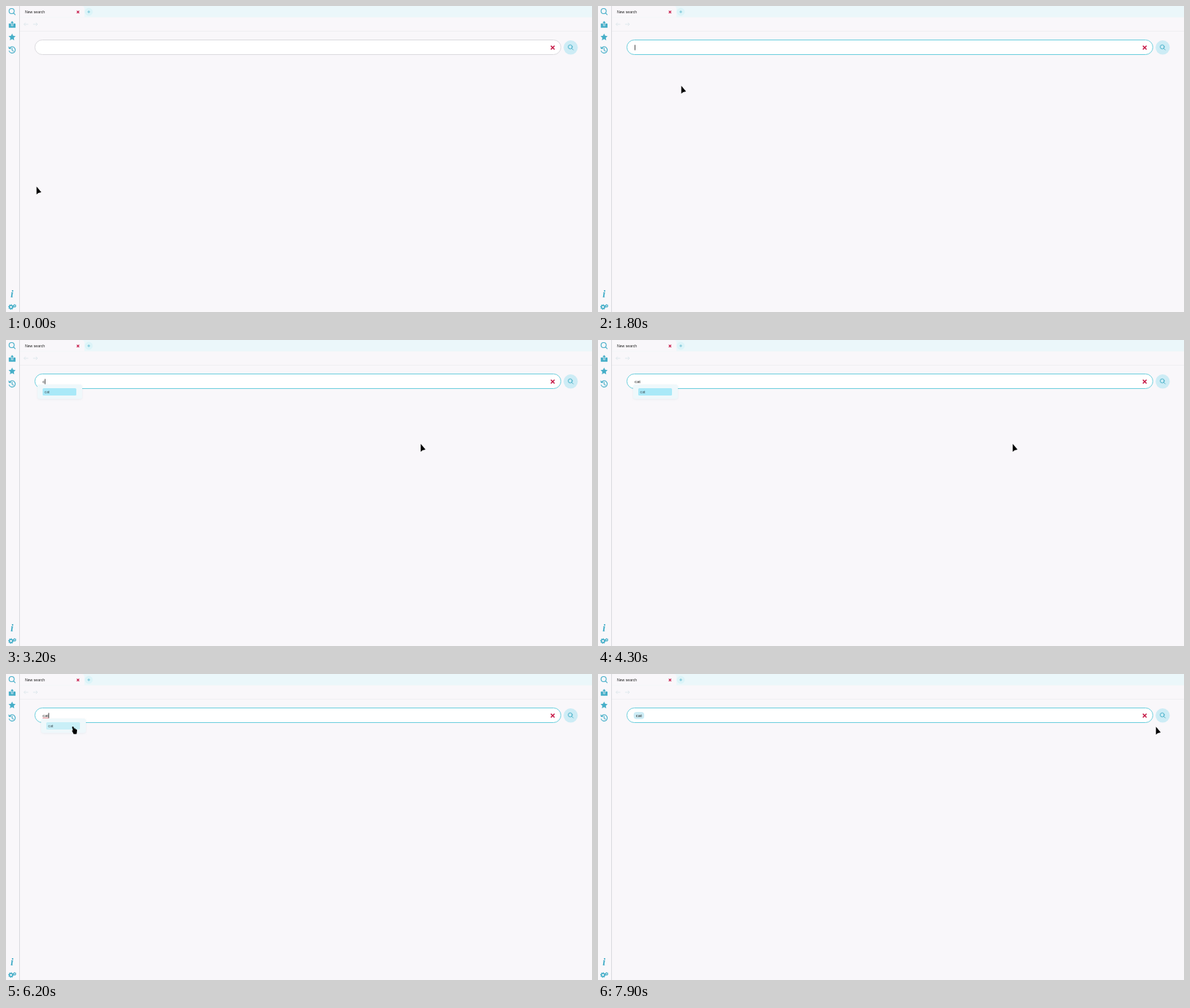
These frames come from a looping animation (800 px wide and 419 px high, 8000 ms). An HTML page:

```html
<!DOCTYPE html>
<html lang="en">
<head>
<meta charset="utf-8">
<title>Search field</title>
<style>
  html, body { margin: 0; width: 100%; height: 100%; overflow: hidden; background: #f9f7fa; }
  svg { display: block; width: 100vw; height: 100vh; }
  text { font-family: "Liberation Sans", Arial, sans-serif; font-size: 6px; fill: #222; }
  .line { fill: none; stroke: #45aec8; stroke-width: 1.1; stroke-linecap: round; stroke-linejoin: round; }
  .solid { fill: #45aec8; }
  .info { font: italic bold 14px "Liberation Serif", "Times New Roman", serif; fill: #45aec8; }
  .cross { fill: none; stroke: #c30d3f; }
</style>
</head>
<body>
<svg viewBox="0 0 800 419" preserveAspectRatio="none">
  <defs>
    <filter id="soft" x="-20%" y="-40%" width="140%" height="190%">
      <feDropShadow dx="0" dy=".6" stdDeviation="1.2" flood-color="#7fa5b0" flood-opacity=".16"/>
    </filter>
  </defs>
  <rect width="800" height="419" fill="#f9f7fa"/>

  <!-- tab strip and toolbar -->
  <rect x="19" width="781" height="15.5" fill="#ebf7fa"/>
  <path d="M19 0H103Q107 0 107 4V15.5H19Z" fill="#f9f7fa"/>
  <text x="26" y="10" style="font-size:5.15px">New search</text>
  <path class="cross" stroke-width="1.1" d="M96.7 6.7l3.2 3.2m0-3.2l-3.2 3.2"/>
  <circle cx="113" cy="8" r="5.4" fill="#dcf4f8"/>
  <path class="line" stroke-linecap="butt" style="stroke-width:.6" d="M111.5 8h3M113 6.5v3"/>
  <path d="M24.5 25h6M26.7 22.8L24.5 25l2.2 2.2M37 25h6M40.8 22.8L43 25l-2.2 2.2" fill="none" stroke="#dce6ea" stroke-width=".9"/>
  <path d="M19 34.5H800" stroke="#f0eff2" stroke-width="1"/>

  <!-- side bar -->
  <path d="M18.5 0V419" stroke="#dadade" stroke-width="1"/>
  <g class="line">
    <circle cx="7.7" cy="7" r="3.5"/>
    <path d="M10.3 9.7l2.2 2.2"/>
    <path d="M4.7 57.8A4.3 4.3 0 1 1 4.3 61.6M3.9 56l.5 2.3 2.3-.2M8.3 57.9v2.7l1.8 1.1"/>
  </g>
  <rect class="solid" x="3.8" y="24" width="9.2" height="5.8" rx=".6"/>
  <path class="solid" d="M8.4 20.2L11.5 23.6H9.4V27H7.4V23.6H5.3Z" stroke="#f9f7fa" stroke-width=".7"/>
  <path class="solid" d="M8.3 37.8l1.45 3.05 3.35.45-2.45 2.3.6 3.3-2.95-1.6-2.95 1.6.6-3.3-2.45-2.3 3.35-.45Z"/>
  <text class="info" x="6.3" y="399.3">i</text>
  <g id="gears"></g>

  <!-- search field -->
  <rect id="field" x="39.5" y="46.5" width="718" height="20" rx="10" fill="#fff" stroke-width="1"/>
  <path class="cross" stroke-width="1.4" d="M743.8 54.4l5 5m0-5l-5 5"/>
  <circle cx="770.9" cy="56.8" r="9.7" fill="#cdecf5"/>
  <g class="line" style="stroke-width:.9">
    <circle cx="770.3" cy="56" r="2.8"/>
    <path d="M772.4 58.1l2 2"/>
  </g>

  <g id="chip">
    <rect x="48.7" y="52" width="14.4" height="9.7" rx="4" fill="#cdecf5"/>
    <text x="51.8" y="59">cat</text>
  </g>
  <text id="typed" x="50" y="59"></text>
  <path id="squiggle" d="M50 60.6l1-.8 1 .8 1-.8 1 .8 1-.8 1 .8 1-.8 1 .8" fill="none" stroke="#e0303a" stroke-width=".6"/>
  <g id="popup">
    <rect x="43" y="61" width="61" height="19.8" rx="3" fill="#eff8fb" filter="url(#soft)"/>
    <rect id="option" x="50" y="66" width="46" height="10" rx="1.5"/>
    <text x="52.5" y="73" style="font-size:5.3px;fill:#40545c">cat</text>
  </g>
  <path id="caret" d="M0 53.3v7.2" stroke="#222" stroke-width=".8"/>

  <g id="cursor">
    <path id="arrow" d="M.7 .2V10.9L3.2 9 7.2 8Z"/>
    <path id="beam" d="M-1.5 -4h3M0 -4v8M-1.5 4h3" stroke="#222" stroke-width=".8"/>
    <path id="hand" d="M-.1 0Q1.2-.4 1.5 .9L2 3.4Q3-.1 3.6 3.5 4.5 3 4.8 4.1 5.9 3.8 6 5.2L5.7 8.3 5.2 10.2H1.4L-.6 6.6Q-1.7 5.4-.3 5.2L.4 5.8-.7 1Q-.8.2-.1 0Z"/>
  </g>
</svg>
<script>
const LOOP = 8000, STEP = 100, BLINK = 530;
const $ = id => document.getElementById(id);
const show = (id, on) => { $(id).style.display = on ? "" : "none"; };

// pointer stops: time, x, y
const path = [
  [0, 41, 247], [200, 48, 232], [800, 114.5, 81], [1100, 118, 57], [1400, 118, 57],
  [1800, 113, 109], [2500, 113, 109], [3200, 565.5, 142], [4700, 565.5, 142],
  [5200, 205, 90], [5450, 150, 82], [5900, 91, 72], [6500, 91, 72],
  [7200, 470, 125], [7700, 761, 72], [8000, 761, 72]
];
const FOCUS = 1400, PICK = 6300;
const keys = [[3000, "c"], [3400, "ca"], [3600, "cat"]];
const caretAt = [50.5, 53.3, 56.6, 58.3];

function gear(x, y, r, teeth) {
  let d = "";
  for (let i = 0; i < teeth * 4; i++) {
    const a = (i + .5) / (teeth * 4) * Math.PI * 2;
    const q = i % 4 < 2 ? r : r * .78;
    d += (i ? "L" : "M") + (x + q * Math.cos(a)).toFixed(2) + " " + (y + q * Math.sin(a)).toFixed(2);
  }
  const h = r * .36;
  d += `ZM${x - h} ${y}a${h} ${h} 0 1 0 ${2 * h} 0a${h} ${h} 0 1 0 ${-2 * h} 0Z`;
  return `<path class="solid" fill-rule="evenodd" d="${d}"/>`;
}
$("gears").innerHTML = gear(6.8, 412.2, 3.8, 8) + gear(11.8, 410.6, 2.3, 6);

function pointerAt(t) {
  const i = Math.max(1, path.findIndex(p => p[0] > t));
  const [t0, x0, y0] = path[i - 1], [t1, x1, y1] = path[i];
  const u = (t - t0) / (t1 - t0), e = u * u * (3 - 2 * u);
  return [x0 + (x1 - x0) * e, y0 + (y1 - y0) * e];
}

function draw(t) {
  const focused = t >= FOCUS, picked = t >= PICK;
  const word = picked ? "" : keys.reduce((w, [at, s]) => t >= at ? s : w, "");
  const [x, y] = pointerAt(t);
  const open = word !== "";
  const hover = open && x < 101 && y > 65 && y < 77;
  const inField = !hover && x > 40 && x < 757 && y > 47 && y < 66;

  $("field").setAttribute("stroke", focused ? "#6dcfdd" : "#dcdbdf");
  $("typed").textContent = word;
  show("chip", picked);
  show("squiggle", t >= 5900 && !picked);
  show("popup", open);
  $("popup").setAttribute("transform", `translate(${[0, 0, 3, 5][word.length]} 0)`);
  $("option").setAttribute("fill", hover ? "#c9eff7" : "#a9e9f8");

  // the blink restarts on focus, on each key and on the pick
  const since = [FOCUS, ...keys.map(k => k[0]), PICK].reduce((a, b) => t >= b ? b : a, 0);
  show("caret", focused && Math.floor((t - since) / BLINK) % 2 === 0);
  $("caret").setAttribute("transform", `translate(${picked ? 66 : caretAt[word.length]} 0)`);

  show("arrow", !hover && !inField);
  show("beam", inField);
  show("hand", hover);
  $("cursor").setAttribute("transform", `translate(${x.toFixed(1)} ${y.toFixed(1)})`);
}

const start = performance.now();
function tick() {
  const t = (performance.now() - start) % LOOP;
  draw(Math.floor(t / STEP) * STEP);
  requestAnimationFrame(tick);
}
tick();
</script>
</body>
</html>
```
